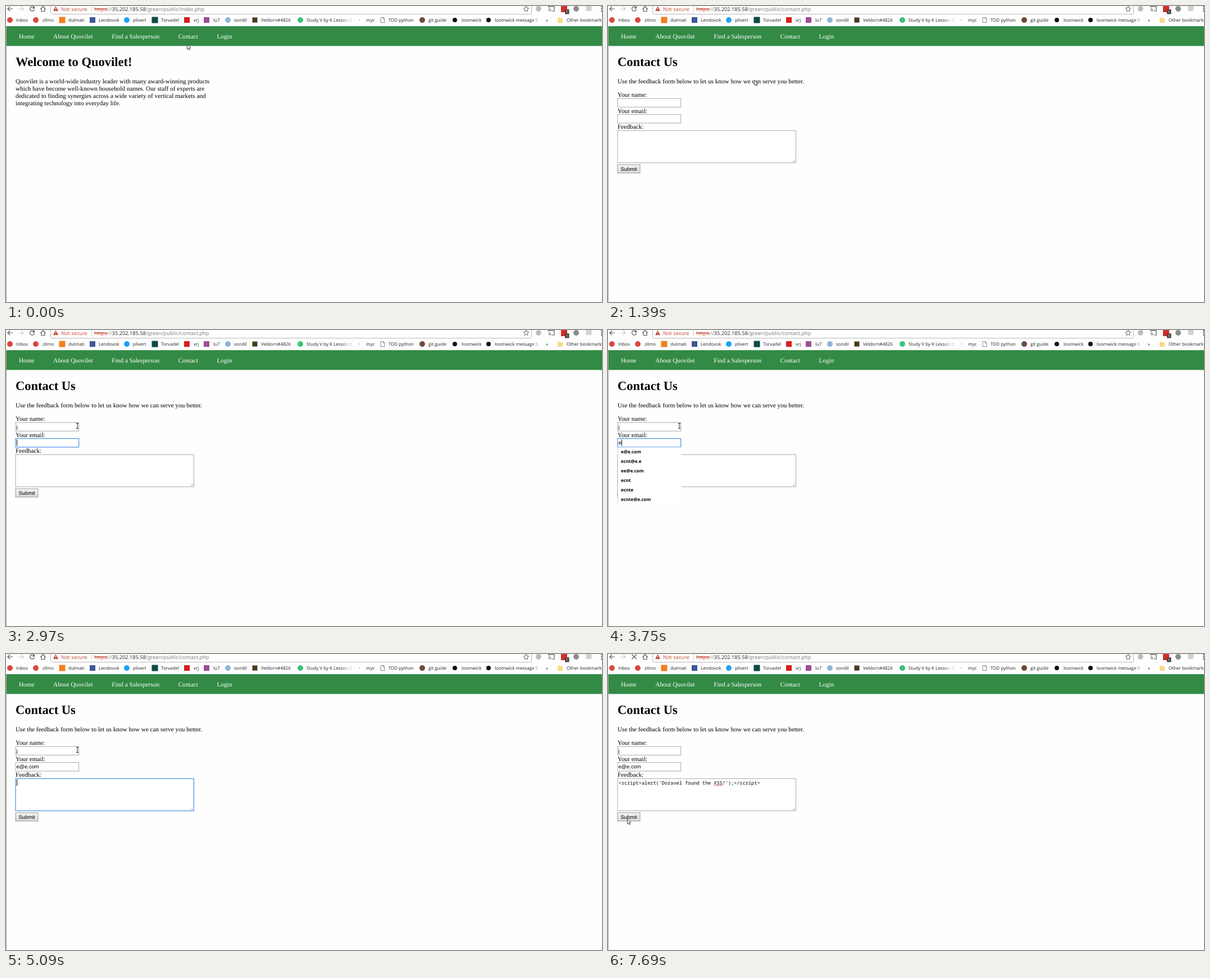
An HTML page that plays this animation: 1061 by 528 pixels, repeating every 8000 ms.

```html
<!DOCTYPE html>
<html lang="en">
<head>
<meta charset="utf-8">
<title>Contact form</title>
<style>
  html, body { margin: 0; width: 100%; height: 100%; overflow: hidden; background: #fefefe; }
  svg { display: block; text-rendering: geometricPrecision; }
  text { white-space: pre; }
  .ui { font: 8.05px "Open Sans", sans-serif; fill: #222; }
  .url { font: 9.28px "Open Sans", sans-serif; fill: #777; }
  .page { font: 11.25px "Liberation Serif", serif; }
  .title { font: bold 22.5px "Liberation Serif", serif; }
  .input { font: 9.37px "Liberation Sans", sans-serif; }
  .code { font: 8.57px "Noto Sans Mono", monospace; }
  .menu { font: bold 8px "Open Sans", sans-serif; }
  .line { fill: none; stroke: #555; stroke-width: 1.2; }
  .field { fill: #fff; stroke: #a9a9a9; }
  .field.focus { stroke: #5794e8; stroke-width: 1.3; }
</style>
</head>
<body>
<svg width="1061" height="528" viewBox="0 0 1061 528">
  <defs>
    <linearGradient id="fade"><stop stop-color="#fefefe" stop-opacity="0"/><stop offset="1" stop-color="#fefefe"/></linearGradient>
    <linearGradient id="raised" x2="0" y2="1"><stop stop-color="#f6f6f6"/><stop offset="1" stop-color="#d8d8d8"/></linearGradient>
  </defs>

  <!-- Toolbar -->
  <rect x="79.5" y="-6" width="856" height="20.5" rx="2" fill="#fff" stroke="#b8b8b8"/>
  <path class="line" d="M12 5H3M7 1L3 5L7 9"/>
  <path class="line" style="stroke:#ccc" d="M22 5H31M27 1L31 5L27 9"/>
  <g id="reload"><path class="line" d="M49.6 2.4A4 4 0 1 0 50.5 6"/><path d="M51 0V4.4H46.6z" fill="#555"/></g>
  <path id="stop" class="line" d="M42.5 1L50.5 9M50.5 1L42.5 9"/>
  <path class="line" d="M61.5 5.2L66 .8L70.5 5.2M63 4.5V9.5H69V4.5"/>
  <path d="M88.5 .5L93 9H84z" fill="#c5402f"/>
  <path d="M88.5 3.5V6M88.5 7V8" stroke="#fff"/>
  <text class="url" x="98" y="8.6" style="fill:#c5402f">Not secure</text>
  <path d="M152.5 0V11" stroke="#ccc"/>
  <text class="url" x="157" y="8.6"><tspan fill="#c5402f">https</tspan>://<tspan fill="#222">35.202.185.58</tspan>/green/public/<tspan id="file"></tspan></text>
  <path d="M157 5.5H181" stroke="#c5402f"/>
  <path class="line" style="stroke-width:.9" d="M926 .3l1.4 3.2 3.5.3-2.7 2.3.8 3.4-3-1.8-3 1.8.8-3.4-2.7-2.3 3.5-.3z"/>
  <circle cx="948" cy="5" r="4.8" fill="#bbb"/>
  <path class="line" d="M966 3V.8H976V9H972M966 5.2A4 4 0 0 1 970 9.2M966 7.6A1.6 1.6 0 0 1 967.6 9.2"/>
  <rect x="988" y="0" width="11" height="11" fill="#d32d27"/>
  <rect x="995" y="6" width="7.5" height="8.5" rx="1" fill="#444"/>
  <text class="ui" x="996.7" y="13" style="fill:#fff;font-size:7px">1</text>
  <circle cx="1015" cy="5" r="5" fill="#8c8c8c"/>
  <rect x="1032.5" y="0" width="10" height="9" fill="#d2d2d2"/>
  <g fill="#555"><circle cx="1060.5" cy="1" r="1.2"/><circle cx="1060.5" cy="5" r="1.2"/><circle cx="1060.5" cy="9" r="1.2"/></g>

  <!-- Bookmarks -->
  <g id="bookmarks"></g>
  <path d="M667 20.5H671.5L674 23V29.5H667zM671.5 20.5V23H674" fill="#fff" stroke="#777" stroke-width=".9"/>
  <path d="M982 21H986L987 22H991V30H982z" fill="#f7db84"/>
  <rect x="598" y="18" width="15" height="14" fill="url(#fade)"/>
  <rect x="936" y="18" width="15" height="14" fill="url(#fade)"/>

  <!-- Page -->
  <path d="M.5 36V528" stroke="#aaa"/>
  <rect x="1" y="36" width="1060" height="35.3" fill="#338a45"/>
  <g class="page" fill="#fff">
    <text x="23" y="58">Home</text><text x="84.3" y="58">About Quovilet</text><text x="188.2" y="58">Find a Salesperson</text>
    <text x="306.8" y="58">Contact</text><text x="375.5" y="58">Login</text>
  </g>
  <g id="home" class="page">
    <text class="title" x="17" y="107">Welcome to Quovilet!</text>
    <text x="17" y="138">Quovilet is a world-wide industry leader with many award-winning products</text>
    <text x="17" y="151">which have become well-known household names. Our staff of experts are</text>
    <text x="17" y="164">dedicated to finding synergies across a wide variety of vertical markets and</text>
    <text x="17" y="177">integrating technology into everyday life.</text>
  </g>
  <g id="form" class="page">
    <text class="title" x="17" y="107">Contact Us</text>
    <text x="17" y="138">Use the feedback form below to let us know how we can serve you better.</text>
    <text x="17" y="162">Your name:</text>
    <text x="17" y="190.6">Your email:</text>
    <text x="17" y="219.3">Feedback:</text>
    <rect id="nameBox" class="field" x="17" y="165" width="112.6" height="15.3"/>
    <rect id="emailBox" class="field" x="17" y="193.6" width="112.6" height="15.3"/>
    <rect id="noteBox" class="field" x="17" y="222.3" width="317.4" height="57.4"/>
    <path d="M328.5 278.5L333 274M331 278.5L333 276.5" stroke="#999" stroke-width=".8"/>
    <text id="name" class="input" x="18.4" y="175.8"></text>
    <text id="email" class="input" x="18.4" y="204.4"></text>
    <text id="note" class="code" x="18.8" y="233"></text>
    <path id="squiggle" d="M188.5 235l1.3-1 1.3 1 1.3-1 1.3 1 1.3-1 1.3 1 1.3-1 1.3 1 1.3-1 1.3 1 1.3-1 1.3 1" fill="none" stroke="#e33" stroke-width=".9"/>
    <rect id="button" x="17" y="283.2" width="40" height="14.8" stroke="#9a9a9a"/>
    <text class="input" x="22.6" y="293.6">Submit</text>
    <rect id="caret" width="1" height="11"/>
  </g>
  <g id="menus"></g>

  <!-- Pointers, each with its hot spot at 0,0 -->
  <g id="pointer" stroke-linejoin="round">
    <path id="arrow" d="M.5 .5V9.2L2.6 7.3L4 10.5L5.4 9.9L4.1 6.9H7z" fill="#fff" stroke="#333" stroke-width=".9"/>
    <path id="hand" d="M3 9V1.5Q3.8 .2 4.6 1.5V5.5Q9.5 5.4 9.5 7.5V10L8.6 13.5H3.8L.6 8.6Q1.2 7.4 3 9z" fill="#fff" stroke="#333" stroke-width=".9"/>
    <path id="beam" d="M-2-4.5H2M0-4.5V4.5M-2 4.5H2" fill="none" stroke="#222"/>
  </g>
</svg>

<script>
const LOOP = 8000;
const $ = id => document.getElementById(id);
const show = (id, on) => $(id).style.display = on ? '' : 'none';

function add(parent, tag, attrs, text = '') {
  const el = document.createElementNS('http://www.w3.org/2000/svg', tag);
  for (const key in attrs) el.setAttribute(key, attrs[key]);
  el.textContent = text;
  parent.append(el);
  return el;
}

// label, label x, icon x, icon colour, icon radius (positive: circle, negative: square)
const bookmarks = [
  ['Inbox', 18, 7, '#d9493f', 5], ['zilmo', 65, 53, '#d9493f', 5], ['dulmati', 111, 100, '#f2801e', -5.5],
  ['Lendovok', 165, 154, '#3b5998', -5], ['plivert', 226, 215, '#1da1f2', 5], ['Torvadel', 276, 265, '#0b4a48', -5.5],
  ['vrj', 334, 322, '#d81e1e', -5], ['lu7', 369, 357, '#9b4f96', -5], ['sondil', 406, 395, '#8fb4d6', 5],
  ['Veldorn#4826', 454, 443, '#4a3a20', -4.5], ['Study V by K Lessons:', 535, 524, '#3cc27a', 5],
  ['myc', 641, 629, '#aaa', 1], ['TDD python', 681], ['git guide', 752, 741, '#6b4a3a', 5],
  ['loomwick', 811, 799, '#111', 4], ['loomwick message b', 870, 859, '#111', 4],
  ['»', 961], ['Other bookmarks', 998]
];
for (const [label, x, iconX, fill, r] of bookmarks) {
  add($('bookmarks'), 'text', { class: 'ui', x, y: 28 }, label);
  if (r > 0) add($('bookmarks'), 'circle', { cx: iconX, cy: 25, r, fill });
  if (r < 0) add($('bookmarks'), 'rect', { x: iconX + r, y: 25 + r, width: -2 * r, height: -2 * r, fill });
}

function addMenu(id, y, width, items) {
  const menu = add($('menus'), 'g', { id, class: 'menu' });
  const height = items.length * 16.9;
  add(menu, 'rect', { x: 17, y, width, height, fill: '#fff' });
  add(menu, 'path', { d: `M17.5 ${y}v${height}`, stroke: '#ccc' });
  items.forEach((item, i) => add(menu, 'text', { x: 23, y: y + 11 + i * 16.85 }, item));
}
addMenu('nameMenu', 181.3, 155.5, ['j', 'just a longer line of text']);
addMenu('emailMenu', 209.3, 114, ['e@e.com', 'ecnt@e.e', 'ee@e.com', 'ecnt', 'ecnte', 'ecnte@e.com']);
addMenu('matchMenu', 209.3, 114, ['e@e.com']);

// Each track lists [start time, value...]; a value holds until the next start.
const tracks = {
  pointer: [
    [0, 'arrow', 322, 68], [150, 'arrow', 322, 64], [270, 'arrow', 322, 61],
    [390, 'hand', 322, 59], [540, 'hand', 322, 58],
    [1130, 'arrow', 299, 89], [1270, 'arrow', 282, 108], [1390, 'arrow', 260, 132], [1510, 'arrow', 228, 156],
    [1630, 'arrow', 190, 178], [1750, 'arrow', 150, 182], [1870, 'beam', 127, 171],
    [6300, 'beam', 95, 201], [6420, 'arrow', 14, 225], [6570, 'arrow', 3, 264], [6700, 'arrow', 9, 287],
    [6840, 'arrow', 22, 294], [6960, 'arrow', 31, 294], [7110, 'arrow', 34, 294]
  ],
  loading: [[0, false], [820, true], [1390, false], [7690, true]],
  file: [[0, 'index.php'], [1390, 'contact.php']],
  name: [[0, ''], [2570, 'j']],
  email: [[0, ''], [3750, 'e'], [4150, 'e@'], [4420, 'e@e'], [4700, 'e@e.'], [4820, 'e@e.c'], [4970, 'e@e.com']],
  note: [[0, ''], [5900, "<script>alert('Doravel found the XSS!');<\/script>"]],
  focus: [[0, ''], [2140, 'name'], [2970, 'email'], [5090, 'note'], [7540, '']],
  caret: [[0, ''], [2140, 'name'], [2970, 'email'], [3470, ''], [3750, 'email'], [5090, 'note'],
    [5620, ''], [5900, 'note'], [6420, ''], [6960, 'note'], [7380, '']],
  menu: [[0, ''], [2690, 'nameMenu'], [2970, ''], [3750, 'emailMenu'], [4150, 'matchMenu'], [5090, '']],
  pressed: [[0, false], [7540, true], [7690, false]]
};

function draw(t) {
  const at = track => tracks[track].findLast(([start]) => start <= t).slice(1);

  const [kind, x, y] = at('pointer');
  $('pointer').setAttribute('transform', `translate(${x} ${y})`);
  for (const id of ['arrow', 'hand', 'beam']) show(id, id === kind);

  const [loading] = at('loading'), [file] = at('file');
  show('stop', loading);
  show('reload', !loading);
  $('file').textContent = file;
  show('home', file === 'index.php');
  $('form').style.opacity = file === 'contact.php' ? 1 : 0;

  const [focus] = at('focus'), [caret] = at('caret'), [menu] = at('menu'), [pressed] = at('pressed');
  for (const id of ['name', 'email', 'note']) {
    $(id).textContent = at(id)[0];
    $(id + 'Box').classList.toggle('focus', id === focus);
  }
  for (const id of ['nameMenu', 'emailMenu', 'matchMenu']) show(id, id === menu);
  show('squiggle', $('note').textContent);
  $('button').setAttribute('fill', pressed ? '#d4d4d4' : 'url(#raised)');

  show('caret', caret);
  if (caret) {
    const end = 18.6 + $(caret).getComputedTextLength();
    $('caret').setAttribute('x', Math.round(end));
    $('caret').setAttribute('y', { name: 167, email: 195.5, note: 224 }[caret]);
  }
}

function tick() {
  draw(performance.now() % LOOP);
  requestAnimationFrame(tick);
}
tick();
</script>
</body>
</html>
```
